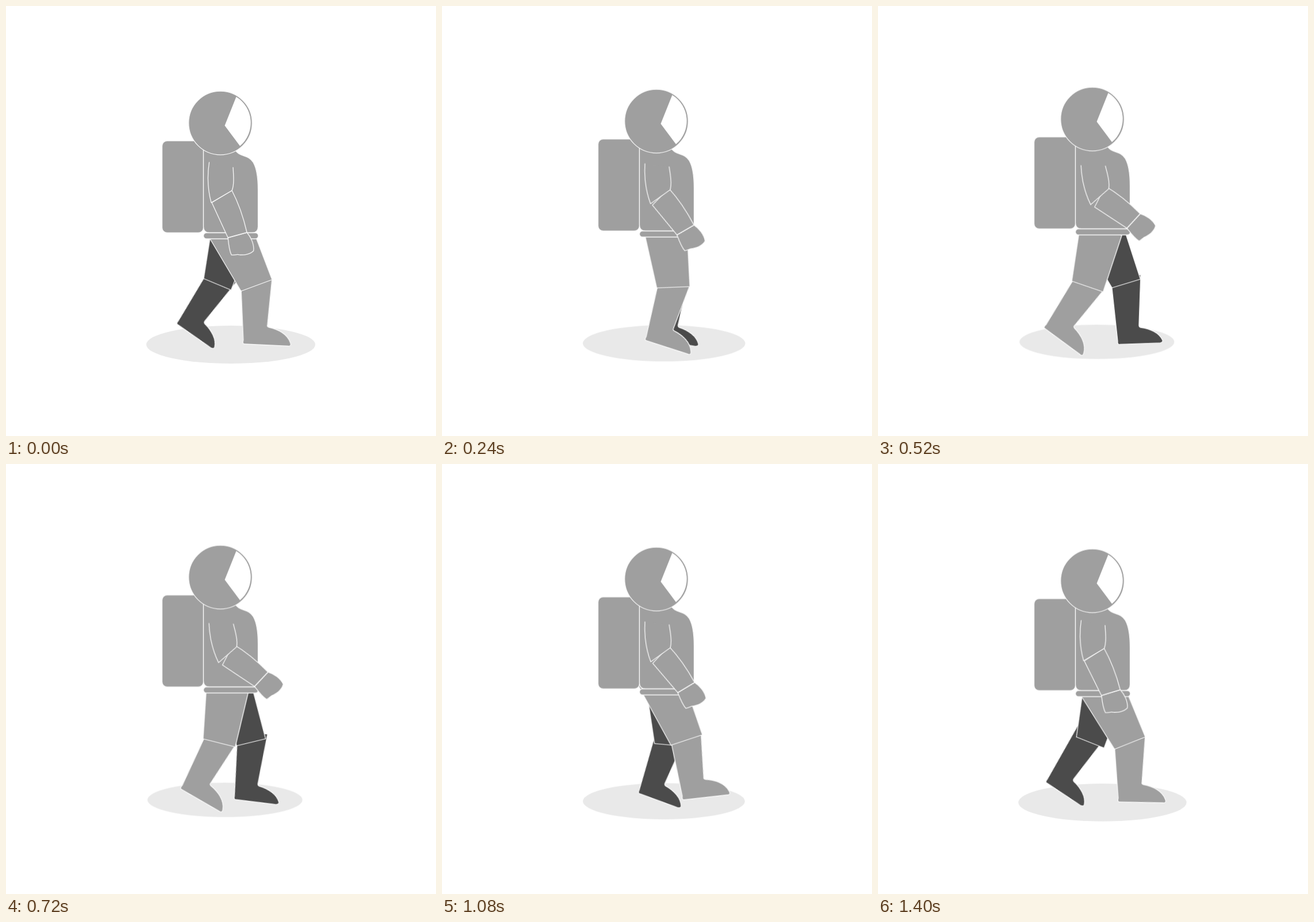
Write an HTML page that moves like this. It is 748 px wide and 748 px high and loops after 1440 ms.

```html
<!DOCTYPE html>
<html lang="en">
<head>
<meta charset="utf-8">
<title>Walking astronaut</title>
<style>
  html, body { margin: 0; width: 100%; height: 100%; overflow: hidden; background: #fff; }
  svg { display: block; width: 100vw; height: 100vh; }
  .suit { fill: #9f9f9f; stroke: #f8f8f8; stroke-width: 1.3; stroke-linejoin: round; stroke-linecap: round; }
  .dark { fill: #4b4b4b; }
  .move { animation: 1440ms linear infinite; }

  .shadow { fill: #e9e9e9; transform-origin: 391px 589px; animation-name: shadow; }
  .body { animation-name: bob; }
  .arm { transform-origin: 417px 280px; animation-name: arm; }
  .forearm { transform-origin: 375px 331.5px; animation-name: forearm; }
  .near-leg { transform-origin: 388px 390px; animation-name: near-leg; }
  .near-shin { transform-origin: 436px 486px; animation-name: near-shin; }
  .far-leg { transform-origin: 407.2px 397.7px; animation-name: far-leg; }
  .far-shin { transform-origin: 432px 488.8px; animation-name: far-shin; }

  @keyframes shadow { 41.667% { transform: translate(-11.8px, -5.5px) scale(.903, .89); } }
  @keyframes bob { 0%, 100% { transform: translateY(0); } 41.667% { transform: translateY(-7.8px); } }
  @keyframes arm { 0%, 100% { transform: rotate(0deg); } 41.667% { transform: rotate(-12.7deg); } }
  @keyframes forearm { 0%, 100% { transform: rotate(0deg); } 41.667% { transform: rotate(-24.3deg); } }

  @keyframes near-leg {
    0%, 100% { transform: translate(0px, 0px) rotate(0deg); }
    8.333% { transform: translate(-1.6px, -3px) rotate(9deg); }
    25% { transform: translate(-1.3px, -4.5px) rotate(27deg); }
    36.111% { transform: translate(0px, 0px) rotate(39.2deg); }
    41.667% { transform: translate(-.5px, -1px) rotate(45.2deg); }
    50% { transform: translate(-2.5px, -4.5px) rotate(34.5deg); }
    75% { transform: translate(-7px, -4.2px) rotate(2.1deg); }
    83.333% { transform: translate(-4.5px, -2.7px) rotate(-8.7deg); }
    97.222% { transform: translate(0px, 1px) rotate(-1.4deg); }
  }
  @keyframes near-shin {
    0%, 100% { transform: rotate(0deg); }
    8.333% { transform: rotate(-1.5deg); }
    25% { transform: rotate(-4.2deg); }
    41.667% { transform: rotate(-6.2deg); }
    50% { transform: rotate(-7deg); }
    75% { transform: rotate(-11.1deg); }
    83.333% { transform: rotate(-11.3deg); }
    97.222% { transform: rotate(-.2deg); }
  }
  @keyframes far-leg {
    0%, 100% { transform: rotate(39.6deg); }
    8.333% { transform: rotate(28.8deg); }
    25% { transform: rotate(7.7deg); }
    36.111% { transform: rotate(0deg); }
    41.667% { transform: rotate(-2.8deg); }
    50% { transform: rotate(3.2deg); }
    75% { transform: rotate(22deg); }
    97.222% { transform: rotate(38.5deg); }
  }
  @keyframes far-shin {
    0%, 100% { transform: translate(-1.5px, -8.4px) rotate(-2.4deg); }
    8.333% { transform: translate(-3.6px, -14px) rotate(-4.4deg); }
    25% { transform: translate(-1.9px, -5.7px) rotate(-10.3deg); }
    27.778% { transform: translate(-1.5px, -4px) rotate(-12.3deg); }
    36.111% { transform: translate(0px, 0px) rotate(0deg); }
    41.667% { transform: translate(.5px, -1.3px) rotate(6.4deg); }
    50% { transform: translate(1.1px, -3.2px) rotate(5.8deg); }
    75% { transform: translate(-4px, -8px) rotate(.2deg); }
    97.222% { transform: translate(-9px, -4.2px) rotate(-2.8deg); }
  }
</style>
</head>
<body>
<svg viewBox="0 0 748 748">
  <ellipse class="move shadow" cx="391" cy="589" rx="147" ry="33"/>
  <g class="move body suit">
    <g class="move far-leg dark">
      <path class="move far-shin" d="M405 480L417 590Q416 596 421 595.5L491 592.8Q496 592 495 588C489 575 473 568 457 566Q453.5 565 454 561L457 474Z"/>
      <path d="M407 497L456.5 482L425.5 386L355 409Z"/>
    </g>
    <g class="move near-leg">
      <path class="move near-shin" d="M409 490L413 581Q411 588 415 588L491 591.5Q497 592 495 586C490 570 472 562 458 559Q454 558 455 555L463 474Z"/>
      <path d="M409 496L463 476L426 379.5L346 390Z"/>
    </g>
    <rect x="271.5" y="234.5" width="72" height="160" rx="9"/>
    <path d="M343.5 246H396C406 266 420 256 430 272C437 284 438.5 300 438.5 320V384Q438.5 394.5 428 394.5H354Q343.5 394.5 343.5 384Z"/>
    <rect x="343.5" y="394.5" width="95.5" height="10.5" rx="5.2"/>
    <circle cx="373" cy="203.5" r="55.3"/>
    <path d="M400.5 158L380.5 208L407 243.5A52.9 52.9 0 0 0 400.5 158Z" fill="#fff" stroke="none"/>
    <g class="move arm">
      <g class="move forearm">
        <path d="M386 403L419 394C426 402 432 415 430.5 426C423 433 414 433 407 433C401 431 397 434 392 433C388 425 387 413 386 403Z"/>
        <path d="M358 342L393 321C404 342 413 368 419 394L386 403Z"/>
      </g>
      <path d="M353.5 272C350 295 351 320 357 342L393 321C397 312 396 296 395 281"/>
    </g>
  </g>
</svg>
</body>
</html>
```
